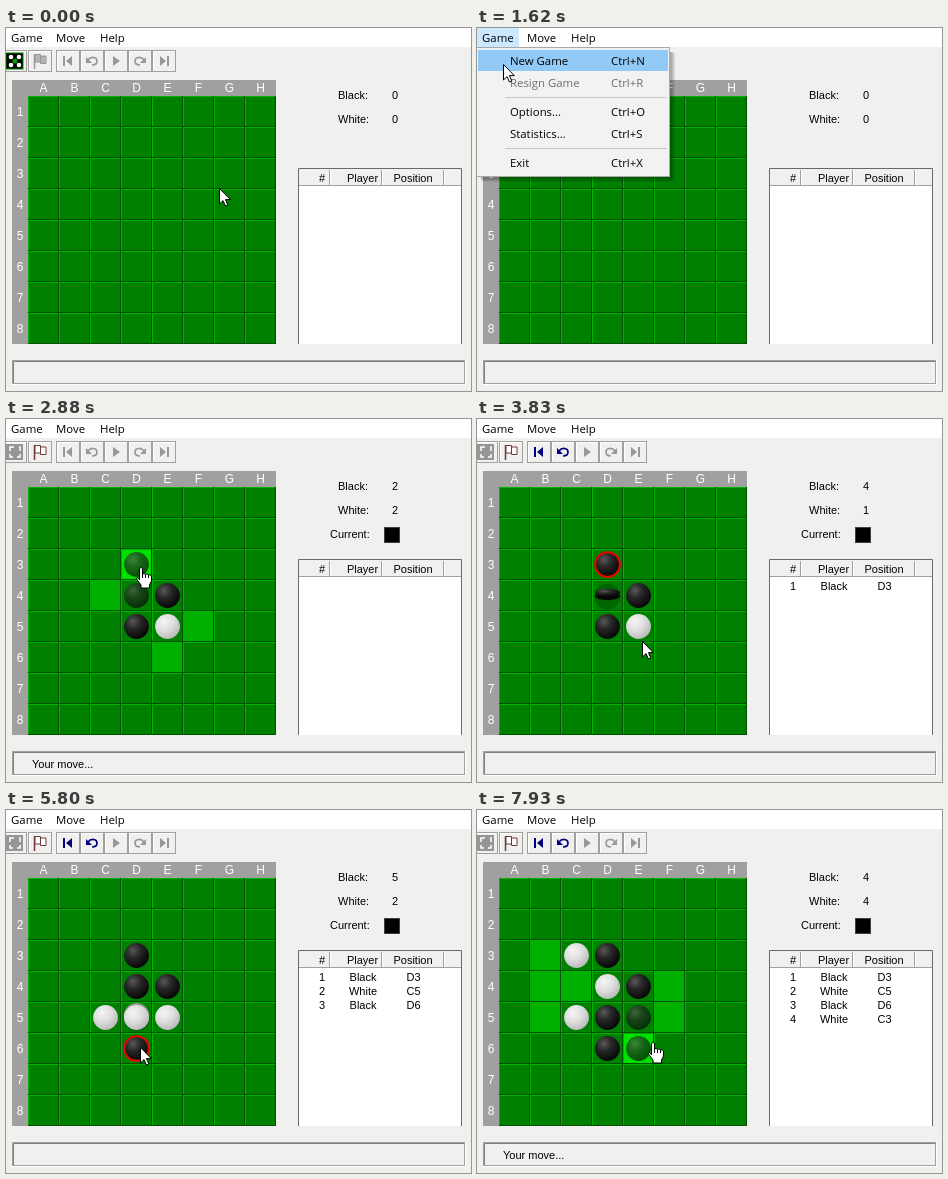
An HTML page that plays this animation: 465 by 363 pixels, repeating every 8000 ms.

```html
<!DOCTYPE html>
<html lang="en">
<head>
<meta charset="utf-8">
<title>Reversi</title>
<style>
html, body { margin: 0; width: 100%; height: 100%; overflow: hidden; background: #f0f0ee; }
svg { display: block; font: 11px "Liberation Sans", Arial, sans-serif; cursor: default; }
.ui { font: 11.4px "Open Sans", "Noto Sans", sans-serif; }
.label { font-size: 12px; fill: #fff; text-anchor: middle; }
.mid { text-anchor: middle; }
</style>
</head>
<body>
<svg width="465" height="363" viewBox="0 0 465 363">
<defs>
<radialGradient id="black" cx=".36" cy=".3" r=".7"><stop offset="0" stop-color="#585858"/><stop offset=".45" stop-color="#262626"/><stop offset="1" stop-color="#080808"/></radialGradient>
<radialGradient id="white" cx=".36" cy=".3" r=".75"><stop offset="0" stop-color="#f4f4f4"/><stop offset=".5" stop-color="#dedede"/><stop offset="1" stop-color="#b8b8b8"/></radialGradient>
</defs>
<g id="fixed"></g>
<g id="live"></g>
</svg>
<script>
const LOOP = 8000, STEP = 80;
const START = 2010, MENU_OPEN = 1310, MENU_PICK = 1930;
const BLACK = 1, WHITE = 2;
const names = ['', 'Black', 'White'], skins = ['', 'url(#black)', 'url(#white)'];
const plays = [[3350, 'D3'], [4230, 'C5'], [5800, 'D6'], [6680, 'C3']];
const turns = [[START, 3350], [5100, 5800], [7540, LOOP]];
// Pointer moves: from, to, x, y
const moves = [
  [220, 920, 19, 8], [1310, 1620, 26, 36], [1930, 2170, 55, 54], [2200, 2410, 154, 168],
  [2560, 2880, 135, 148], [3430, 3830, 165, 222], [3910, 4150, 155, 226], [5100, 5410, 134, 237],
  [6040, 6600, 216, 236], [6680, 7000, 216, 240], [7540, 7620, 197, 244], [7770, 7930, 176, 232]
];

const rect = (x, y, w, h, fill, more = '') => `<rect x="${x}" y="${y}" width="${w}" height="${h}" fill="${fill}" ${more}/>`;
const text = (x, y, s, cls = '', fill = '') => `<text x="${x}" y="${y}" class="${cls}"${fill && ` fill="${fill}"`}>${s}</text>`;
const path = (d, stroke, fill = 'none', w = 1) => `<path d="${d}" stroke="${stroke}" fill="${fill}" stroke-width="${w}"/>`;
const circle = (x, y, r, fill) => `<circle cx="${x}" cy="${y}" r="${r}" fill="${fill}"/>`;
const at = (x, y, s, more = '') => `<g transform="translate(${x} ${y})" ${more}>${s}</g>`;
const clamp = v => Math.max(0, Math.min(1, v));
const cellX = i => 22 + i % 8 * 31;
const cellY = i => 68 + (i >> 3) * 31;
const indexOf = name => (name[1] - 1) * 8 + name.charCodeAt(0) - 65;

function captured(board, i, who) {
  const found = [];
  if (board[i]) return found;
  for (let dy = -1; dy <= 1; dy++) for (let dx = -1; dx <= 1; dx++) {
    if (!dx && !dy) continue;
    const line = [];
    let x = i % 8 + dx, y = (i >> 3) + dy;
    const inside = () => x >= 0 && x < 8 && y >= 0 && y < 8;
    while (inside() && board[y * 8 + x] === 3 - who) {
      line.push(y * 8 + x);
      x += dx; y += dy;
    }
    if (inside() && board[y * 8 + x] === who) found.push(...line);
  }
  return found;
}

function gameAt(t) {
  const board = Array(64).fill(0);
  let last = null;
  if (t >= START) {
    board[27] = board[36] = WHITE;
    board[28] = board[35] = BLACK;
  }
  plays.forEach(([time, name], n) => {
    if (t < time) return;
    const i = indexOf(name), who = n % 2 ? WHITE : BLACK, flips = captured(board, i, who);
    for (const k of [i, ...flips]) board[k] = who;
    last = { time, i, who, flips };
  });
  return { board, last };
}

function pointerAt(t) {
  let x = 213, y = 160;
  for (const [from, to, nx, ny] of moves) {
    if (t < from) break;
    const n = Math.round((to - from) / STEP);
    const p = clamp((Math.floor((t - from) / (to - from) * n) + 1) / (n + 1));
    x += (nx - x) * p;
    y += (ny - y) * p;
  }
  return { x, y };
}

const cell = (i, fill) => {
  const x = cellX(i), y = cellY(i);
  return rect(x, y, 31, 31, fill)
    + path(`M${x + .5} ${y + 30}V${y + .5}H${x + 30}`, '#00b400')
    + path(`M${x} ${y + 30.5}H${x + 30.5}V${y}`, '#005000');
};

function disc(i, who, p = 1) {
  const x = cellX(i) + 15.5, y = cellY(i) + 15.5;
  if (p >= 1) return circle(x, y, 12.4, skins[who]);
  const tilt = Math.PI * p, ry = Math.max(1, 12.4 * Math.abs(Math.cos(tilt))), depth = 3 * Math.sin(tilt);
  const side = p < .5 ? 3 - who : who;
  const oval = (cy, fill) => `<ellipse cx="${x}" cy="${cy}" rx="12.6" ry="${ry}" fill="${fill}"/>`;
  return `<g opacity=".2">${circle(x, y + 1, 13, '#000')}</g>`
    + oval(y - 2 + depth, side === BLACK ? '#080808' : '#999') + oval(y - depth, skins[side]);
}

function button(x, icon) {
  return rect(x + .5, 22.5, 23, 21, '#f0f0ee', 'stroke="#a0a0a0"')
    + path(`M${x + 1.5} 42V23.5H${x + 23}`, '#fff') + at(x + 12, 33, icon);
}

function toolbar(playing, undo) {
  const off = '#989898', back = undo ? '#000080' : off;
  const die = playing
    ? rect(-9, -8, 17, 16, '#969696') + path('M-5-1V-5H-1M4-5H5V-1M-5 2V5H-2M2 5H5V2', '#fff', 'none', 1.5)
    : rect(-9, -8, 17, 16, '#000', 'stroke="#008000"') + circle(0, 0, 2.5, '#00a000')
      + [[-4, -4], [4, -4], [-4, 4], [4, 4]].map(([x, y]) => circle(x, y, 2.3, '#fff')).join('');
  const ink = playing ? '#703838' : off;
  const flag = path('M-5.5-7V8', ink, 'none', 1.5)
    + path('M-5-6.5H.5V-5H6V2.5H.5V1H-5Z', ink, playing ? '#fff' : '#b4b4b4') + path('M.5-5V1', ink);
  const skip = c => rect(-5, -5, 2, 10, c) + path('M4-5V5L-2 0Z', 'none', c);
  const turn = c => path('M-4-1C-1-5 5-4 5 0Q5 4 0 4', c, 'none', 1.7) + path('M-6-4V2H0Z', 'none', c);
  const mirror = s => `<g transform="scale(-1 1)">${s}</g>`;
  return button(-3, die) + button(22, flag) + button(50, skip(back)) + button(74, turn(back))
    + button(98, path('M-3-5V5L4 0Z', 'none', off)) + button(122, mirror(turn(off))) + button(146, mirror(skip(off)));
}

const pickBar = rect(1, 22, 190, 21, '#91c9f7');
const menuItem = (y, s, key, fill = '#000') => text(33, y, s, 'ui', fill) + text(134, y, 'Ctrl+' + key, 'ui', fill);
const newGame = menuItem(37, 'New Game', 'N');

function menu(t, pointer) {
  if (t >= MENU_PICK) {
    const alpha = clamp(1 - (t - MENU_PICK) / 300);
    return `<g opacity="${alpha}">${pickBar}${newGame}</g>`;
  }
  if (t < MENU_OPEN) return '';
  const alpha = clamp((t - MENU_OPEN + STEP) / 240);
  return `<g opacity="${alpha}">`
    + [5, 4, 3, 2].map(d => rect(4, 24, 189 + d, 125 + d, '#000', 'opacity=".08" rx="2"')).join('')
    + rect(-.5, 19.5, 193, 129, '#f2f2f2', 'stroke="#a8a8a8"')
    + (pointer.y > 22 ? pickBar : '') + newGame
    + menuItem(59, 'Resign Game', 'R', '#6d6d6d') + menuItem(88, 'Options...', 'O')
    + menuItem(110, 'Statistics...', 'S') + menuItem(139, 'Exit', 'X')
    + path('M28 69.5H190M28 120.5H190', '#c8c8c8') + '</g>';
}

const arrow = path('M.5 .5V16L4 12.6L6.4 18L8.8 17L6.5 11.6H11.3Z', '#000', '#fff');
const hand = path('M-1.5 13V1.5Q0-.7 1.5 1.5V7Q3 5.5 4.5 7.5Q6 6 7.5 8Q9 7 10.5 9V14L8.5 18V21H0V18L-4.5 12Q-4.5 9.5-2.5 11Z', '#000', '#fff')
  + path('M1.5 7V11M4.5 7.5V11M7.5 8V11', '#000');

function fixedParts() {
  let s = rect(0, 0, 465, 19, '#fff') + rect(6, 52, 264, 264, '#a0a0a0');
  for (let i = 0; i < 8; i++)
    s += text(37.5 + 31 * i, 64.3, 'ABCDEFGH'[i], 'label') + text(14, 88 + 31 * i, i + 1, 'label');
  for (let i = 0; i < 64; i++) s += cell(i, '#008000');
  s += text(332, 71, 'Black:') + text(332, 95, 'White:');
  s += rect(292, 140, 164, 176, '#fff') + rect(293, 141, 162, 16, '#f0f0ee')
    + path('M292.5 316V140.5H455.5V316', '#696969') + path('M293 157.5H455', '#a0a0a0')
    + path('M323.5 142V157M375.5 142V157M437.5 142V157', '#a0a0a0') + path('M324.5 142V157M376.5 142V157M438.5 142V157', '#fff')
    + text(316, 154, '#', 'mid') + text(356.5, 154, 'Player', 'mid') + text(407, 154, 'Position', 'mid');
  return s + rect(6.5, 332.5, 452, 23, '#f0f0ee', 'stroke="#a0a0a0"')
    + path('M7.5 355V333.5H458', '#808080') + path('M6 356.5H459.5V332', '#fff');
}

function liveParts(t) {
  const { board, last } = gameAt(t), pointer = pointerAt(t);
  const playing = t >= START, myTurn = turns.some(([a, b]) => t >= a && t < b);
  const count = who => board.filter(v => v === who).length;
  const overGame = pointer.y < 19 && pointer.x < 42;
  let s = '', preview = [], target = -1;

  if (t < MENU_PICK && (overGame || t >= MENU_OPEN)) s += rect(0, 0, 42, 19, '#cce8ff');
  s += text(5, 14, 'Game', 'ui') + text(50, 14, 'Move', 'ui') + text(94, 14, 'Help', 'ui');
  s += toolbar(playing, !!last);

  if (myTurn) for (let i = 0; i < 64; i++) {
    const flips = captured(board, i, BLACK);
    if (!flips.length) continue;
    const dx = pointer.x - cellX(i), dy = pointer.y - cellY(i);
    const hit = dx >= 0 && dx < 31 && dy >= 0 && dy < 31;
    if (hit) { target = i; preview = [i, ...flips]; }
    s += cell(i, hit ? '#00e000' : '#00b000');
  }
  board.forEach((who, i) => {
    if (!who || preview.includes(i)) return;
    const flipping = last && last.flips.includes(i);
    s += disc(i, who, flipping ? Math.floor((t - last.time) / STEP) * STEP / 800 : 1);
  });
  s += `<g opacity=".65">${preview.map(i => disc(i, BLACK)).join('')}</g>`;
  if (last && !myTurn)
    s += `<circle cx="${cellX(last.i) + 15.5}" cy="${cellY(last.i) + 15.5}" r="12.3" fill="none" stroke="#f00000" stroke-width="2"/>`;

  s += text(386, 71, count(BLACK)) + text(386, 95, count(WHITE));
  if (playing) {
    const white = !myTurn && last.who === WHITE;
    s += text(324, 119, 'Current:') + rect(378.5, 108.5, 15, 15, white ? '#fff' : '#000', `stroke="${white ? '#707070' : '#404040'}"`);
  }
  plays.forEach(([time, name], n) => {
    if (t < time) return;
    const y = 171 + 14 * n;
    s += text(316, y, n + 1, 'mid') + text(357, y, names[n % 2 + 1], 'mid') + text(407.5, y, name, 'mid');
  });
  if (myTurn) s += text(26, 349, 'Your move...');
  return s + menu(t, pointer) + at(pointer.x, pointer.y, target < 0 ? arrow : hand);
}

const live = document.getElementById('live');
document.getElementById('fixed').innerHTML = fixedParts();
function draw() {
  live.innerHTML = liveParts(performance.now() % LOOP);
  requestAnimationFrame(draw);
}
draw();
</script>
</body>
</html>
```
